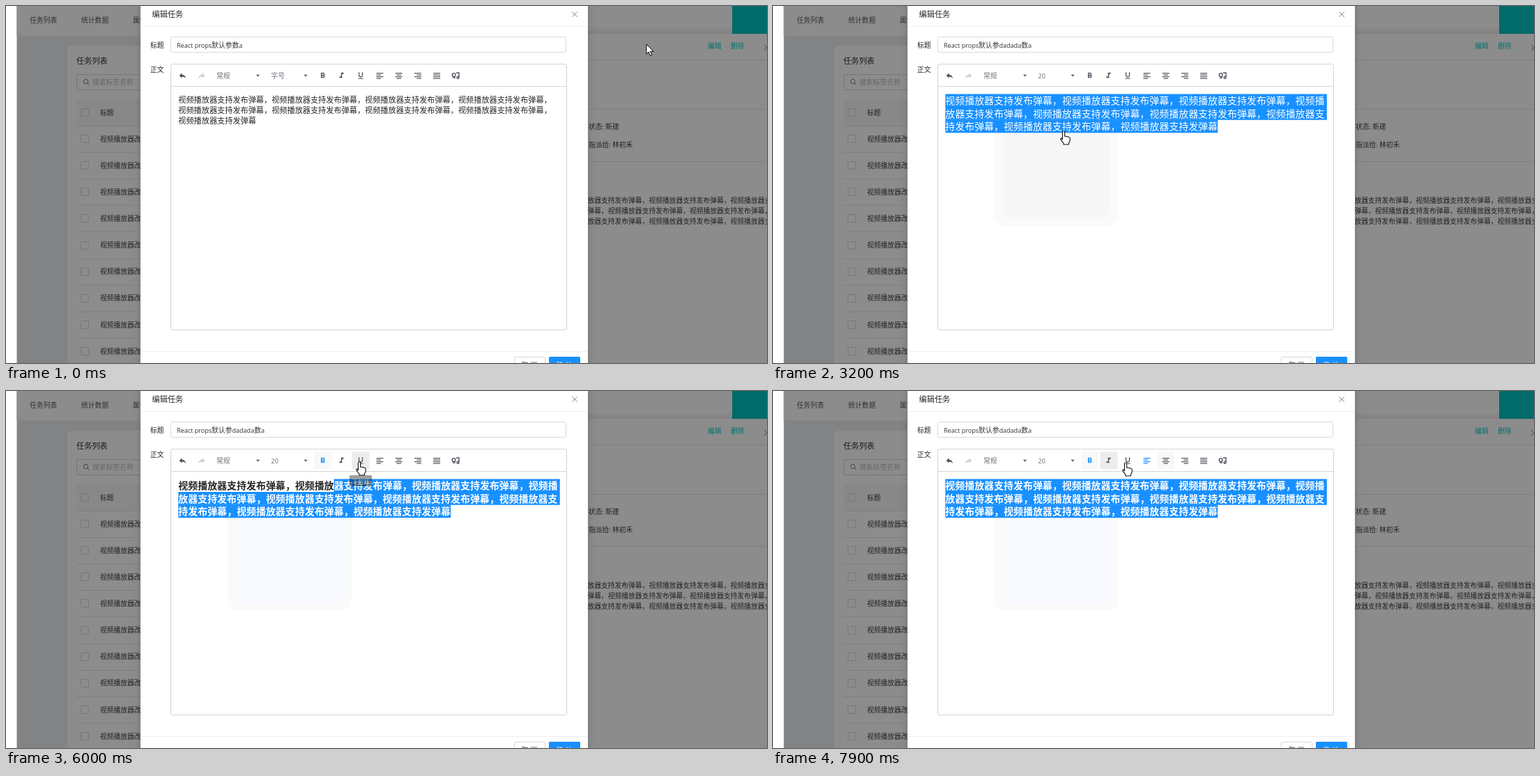
These frames come from a looping animation (1092x513 px, 8 s). An HTML page with a canvas:

```html
<!DOCTYPE html>
<html lang="zh-CN">
<head>
<meta charset="utf-8">
<title>编辑任务</title>
<style>
html, body { margin: 0; width: 100%; height: 100%; overflow: hidden; background: #fff; }
canvas { display: block; }
</style>
</head>
<body>
<canvas id="stage" width="1092" height="513"></canvas>
<script>
const ctx = document.getElementById('stage').getContext('2d');
const LOOP = 8000, STEP = 100;
const BLUE = '#1890ff', INK = '#50545e';
const CJK = '"Noto Sans CJK SC", "Noto Sans CJK", sans-serif';
const LATIN = '"Open Sans", "Noto Sans", sans-serif';

const phrase = '视频播放器支持发布弹幕，';
const body = phrase.repeat(8) + '视频播放器支持发弹幕';
const END = body.length;

// Pointer path: time, x, y
const path = [
  [0, 919, 55], [100, 919, 55], [400, 326, 57], [1100, 326, 57], [1200, 340, 95],
  [1400, 372, 183], [1500, 366, 163], [1600, 310, 150], [1700, 240, 135], [1800, 222, 121],
  [1900, 222, 121], [2300, 406, 108], [2600, 406, 110], [2700, 406, 115], [2900, 411, 166],
  [3000, 411, 166], [3200, 417, 180], [3600, 453, 101], [4100, 455, 101], [4800, 548, 180],
  [4900, 554, 188], [5000, 554, 188], [5200, 640, 176], [5300, 625, 172], [5400, 595, 165],
  [5500, 540, 150], [5600, 471, 137], [5700, 500, 116], [5900, 507, 102], [6200, 507, 102],
  [6400, 535, 102], [6500, 536, 102], [6600, 553, 100], [6700, 557, 99], [6800, 566, 108],
  [7000, 613, 197], [7100, 652, 180], [7200, 600, 176], [7300, 420, 150], [7400, 252, 136],
  [7500, 250, 139], [7600, 198, 139], [7700, 222, 121], [7800, 482, 102], [7900, 506, 103], [8000, 506, 103]
];
// Tooltips: start, end, centre, label
const tips = [
  [2300, 2800, 407, '字号'], [3700, 4200, 454.5, '加粗'], [5900, 6300, 509, '下划线'],
  [6350, 6750, 536.5, '居左'], [6680, 6900, 563.5, '居中']
];
const sizes = [12, 14, 16, 18, 20, 24, 28, 30, 32, 36, 40, 48, 56, 64, 72, 96, 120, 144];

const icons = {
  undo: 'M10 9V5l-7 7 7 7v-4.1c5 0 8.5 1.6 11 5.1-1-5-4-10-11-11z',
  redo: 'M14 9V5l7 7-7 7v-4.1c-5 0-8.5 1.6-11 5.1 1-5 4-10 11-11z',
  bold: 'M15.6 10.8c1-.7 1.65-1.8 1.65-2.8 0-2.3-1.75-4-4-4H7v14h7c2.1 0 3.7-1.7 3.7-3.8 0-1.5-.8-2.8-2.1-3.4zM10 6.5h3a1.5 1.5 0 0 1 0 3h-3zm3.5 9H10v-3h3.5a1.5 1.5 0 0 1 0 3z',
  italic: 'M10 4v3h2.2l-3.4 8H6v3h8v-3h-2.2l3.4-8H18V4z',
  under: 'M12 17c3.3 0 6-2.7 6-6V3h-2.5v8a3.5 3.5 0 0 1-7 0V3H6v8c0 3.3 2.7 6 6 6zm-7 2v2h14v-2z'
};
const pointers = {
  arrow: 'M0 0V14l3.2-3 2.2 5.2 2.4-1-2.2-5H10z',
  hand: 'M-1.6 11.5V1.3a1.6 1.6 0 0 1 3.2 0V7l6 1.2q2 .6 1.8 3l-.6 3.3-1.4 2.6V19H0v-1.6l-3.8-5q-1-1.8.6-2.4z',
  beam: 'M-3-8h2q1 0 1 1v14q0 1-1 1h-2M3-8h-2q-1 0-1 1v14q0 1 1 1h2'
};

const clamp = (v, a = 0, b = 1) => Math.min(b, Math.max(a, v));

function rect(x, y, w, h, fill, stroke, r = 0) {
  ctx.beginPath();
  ctx.roundRect(x, y, w, h, r);
  if (fill) { ctx.fillStyle = fill; ctx.fill(); }
  if (stroke) { ctx.lineWidth = 1; ctx.strokeStyle = stroke; ctx.stroke(); }
}

function shape(d, x, y, k, fill, stroke, width = 1) {
  const p = new Path2D(d);
  ctx.save();
  ctx.translate(x, y);
  ctx.scale(k, k);
  if (fill) { ctx.fillStyle = fill; ctx.fill(p); }
  if (stroke) { ctx.strokeStyle = stroke; ctx.lineWidth = width; ctx.stroke(p); }
  ctx.restore();
}

// Mixed Latin and Chinese text, vertically centred on cy; returns the right edge
function text(s, x, cy, size, color, weight = 400) {
  ctx.fillStyle = color;
  for (const run of s.match(/[ -~]+|[^ -~]+/g) || []) {
    ctx.font = /[ -~]/.test(run) ? `${weight} ${size * .93}px ${LATIN}` : `${weight} ${size}px ${CJK}`;
    ctx.fillText(run, x, cy + size * .37);
    x += ctx.measureText(run).width;
  }
  return x;
}

function centred(s, cx, cy, size, color, weight) {
  ctx.textAlign = 'center';
  text(s, cx, cy, size, color, weight);
  ctx.textAlign = 'left';
}

function cross(x, y, r, color) {
  shape(`M${-r} ${-r}L${r} ${r}M${r} ${-r}L${-r} ${r}`, x, y, 1, null, color);
}

function pointerAt(t) {
  const i = Math.max(1, path.findIndex(p => p[0] >= t));
  const [t0, x0, y0] = path[i - 1], [t1, x1, y1] = path[i];
  const k = clamp((t - t0) / (t1 - t0));
  return [x0 + (x1 - x0) * k, y0 + (y1 - y0) * k];
}

function drawPage() {
  const gray = '#8c8c8c', ink = '#303030', line = '#7f7f7f';
  rect(0, 0, 1092, 513, '#fff');
  rect(15.5, 0, 1077, 513, '#828385');
  rect(15.5, 0, 1077, 42.5, gray);
  ['任务列表', '统计数据', '属性管理'].forEach((s, i) => text(s, 34 + i * 74, 20.5, 9.8, ink));
  rect(88, 57, 300, 500, gray, null, 6);
  text('任务列表', 101, 79, 11.2, '#1c1c1c', 500);
  rect(101.5, 98.5, 200, 22, null, '#777', 1.5);
  shape('M3.2 0a3.2 3.2 0 1 1-6.4 0a3.2 3.2 0 1 1 6.4 0M2.3 2.3L5 5', 114.5, 108.5, 1, null, '#444');
  text('搜索标签名称', 124, 109.5, 9.8, '#666');
  rect(101, 134, 200, 38, '#888889');
  for (let i = 0; i < 10; i++) {
    const cy = 153 + i * 38.12;
    rect(107.5, Math.round(cy) - 5.5, 11, 11, null, '#787878', 1.5);
    text(i ? '视频播放器改造' : '标题', 135, cy, 9.77, '#222', i ? 400 : 500);
    rect(101, Math.round(cy + 19), 200, 1, line);
  }

  rect(1042, 0, 50, 40, '#006b6a');
  const shade = ctx.createLinearGradient(0, 30, 0, 40);
  shade.addColorStop(0, 'rgba(0,0,0,0)');
  shade.addColorStop(1, 'rgba(0,0,0,.08)');
  rect(835, 30, 207, 10, shade);
  rect(800, 40, 292, 473, gray);
  text('编辑', 1007, 57, 9.77, '#00736f', 500);
  text('删除', 1040, 57, 9.77, '#00736f', 500);
  cross(1092, 60, 4, '#444');
  for (const y of [77, 148, 223]) rect(835, y, 257, 1, line);
  text('状态: 新建', 836, 173.5, 9.77, '#222');
  text('指派给: 林初禾', 836, 199.5, 9.77, '#222');
  [3, 9, 3].forEach((from, i) => text(phrase.slice(from) + phrase.repeat(2), 834.5, 279 + i * 15, 9.77, '#222'));

  ctx.save();
  ctx.shadowColor = 'rgba(0,0,0,.2)';
  ctx.shadowBlur = 10;
  rect(193, -20, 642, 560, '#fff');
  ctx.restore();
  text('编辑任务', 209.5, 11.5, 11.2, '#262626', 500);
  cross(816, 12, 3.7, '#8a8a8a');
  rect(193, 29, 642, 1, '#efefef');
  rect(193, 496, 642, 1, '#efefef');
  text('标题', 207, 56, 9.8, '#262626');
  text('正文', 207, 91, 9.8, '#262626');
  rect(729.5, 504.5, 44, 30, null, '#d9d9d9', 1.5);
  rect(779, 504, 45, 30, BLUE, null, 1.5);
  text('取', 740, 516, 9.8, '#333');
  text('消', 752.5, 516, 9.8, '#333');
  text('确', 790, 516, 9.8, '#fff');
  text('认', 802.5, 516, 9.8, '#fff');
}

function drawInput(t) {
  const focus = clamp((t - 400) / 200) * clamp((1650 - t) / 250);
  const typed = 'dadada'.slice(0, clamp(Math.floor((t - 500) / 100), 0, 6));
  rect(236.5, 44.5, 567, 22, '#fff', '#d9d9d9', 2);
  if (focus) {
    ctx.globalAlpha = focus;
    ctx.lineWidth = 3;
    ctx.strokeStyle = 'rgba(24,144,255,.2)';
    ctx.strokeRect(235.5, 43.5, 569, 24);
    rect(236.5, 44.5, 567, 22, null, '#40a9ff', 2);
    ctx.globalAlpha = 1;
  }
  const x = text('React props默认参' + typed, 245, 56.5, 9.77, '#333');
  text('数a', x, 56.5, 9.77, '#333');
  if (t >= 500 && t < 1400) rect(x, 51, 1, 11, '#222');
}

function drawToolbar(t) {
  const [hx, hy] = pointerAt(t - STEP);
  const hovering = hy > 87 && hy < 113;
  const hot = x => hovering && Math.abs(hx - x) < 12.5;
  const bold = t >= 3800;
  if (hovering && hx > 373 && hx < 440) rect(373, 87.5, 67, 25, '#f0f0f0', null, 1.5);
  [454.5, 482, 509, 536.5, 563.5].forEach((x, i) => {
    const faint = i == 0 && bold || i == 4 && t >= 6800;
    if (hot(x) || faint) rect(x - 12.5, 87.5, 25, 25, hot(x) ? '#ececec' : '#f8f8f8', null, 1.5);
  });
  const icon = (name, x, color) => shape(icons[name], x - 6.3, 93.7, .525, color);
  icon('undo', 253.5, INK);
  icon('redo', 280.5, '#d0d0d0');
  text('常规', 302, 100, 9.8, '#6a6f7b');
  text(t < 3100 ? '字号' : '20', 380.5, 100, 9.8, '#6a6f7b');
  for (const x of [361.5, 430]) shape('M-2.6-1.2h5.2L0 1.6z', x, 100, 1, INK);
  icon('bold', 454.5, bold ? BLUE : INK);
  icon('italic', 481.5, INK);
  icon('under', 509, t >= 6100 && t < 7100 ? BLUE : INK);
  // Left, centre, right and justified bars
  for (let k = 0; k < 4; k++)
    for (let row = 0; row < 4; row++) {
      const w = row % 2 && k < 3 ? 6.5 : 10;
      rect(531.5 + k * 27.2 + [0, .5, 1, 0][k] * (10 - w), 96 + row * 2.5, w, 1.2, k == 0 && t >= 6500 ? BLUE : INK);
    }
  shape('M3 0a2.4 2.4 0 1 1-4.8 0a2.4 2.4 0 1 1 4.8 0M4-3h4v6.5M8 3.8a1.5 1.5 0 1 1-3 0a1.5 1.5 0 1 1 3 0M-1 4h4', 642, 99, 1, null, INK, 1.4);
}

function drawBody(t) {
  const big = t >= 3100;
  const size = big ? 13.96 : 11.17, cols = big ? 39 : 48;
  const pitch = big ? 18.5 : 15, top = 126.5, left = 247.3;
  const weight = t >= 3800 ? 700 : 400;

  // The selection trails the pointer by one step
  const dragged = (time, stop) => {
    const [x, y] = pointerAt(Math.min(time, stop) - STEP);
    const row = clamp(Math.floor((y - top) / pitch), 0, 2);
    return Math.min(END, row * cols + clamp(Math.round((x - left) / size), 0, cols));
  };
  let from = END;
  if (t >= 1600) from = dragged(t, 1900);
  if (t >= 5000) from = END;
  if (t >= 5300) from = dragged(t, 5700);
  if (t >= 7100) from = END;
  if (t >= 7200) from = dragged(t, 7500);

  // Faint trace left where the size menu was
  if (big) {
    rect(318, 182, 178, 133, '#fafafa', null, [0, 0, 14, 14]);
    rect(330, 182, 153, 122, t < 3800 ? '#f7f7f7' : '#f7fbff', null, [0, 0, 6, 6]);
  }
  for (let row = 0; row < 3; row++) {
    const a = row * cols, s = body.slice(a, a + cols);
    const y = top + row * pitch, cy = y + pitch / 2 + .4;
    text(s, left, cy, size, '#262626', weight);
    const skip = Math.max(0, from - a);
    if (skip < s.length) {
      const x = left + skip * size;
      const w = (s.length - skip) * size + (row < 2 ? 3 : 0);
      rect(x, y, w, pitch + .3, BLUE);
      text(s.slice(skip), x, cy, size, '#fff', weight);
    }
  }
  const blink = t == 1500 || t == 1600 || t >= 5100 && t < 5300;
  if (blink && from == END) rect(left + (END - 2 * cols) * size, top + 2 * pitch + 1, 1, pitch - 2, '#222');
}

function drawTips(t) {
  for (const [start, end, x, label] of tips) {
    if (t < start || t >= end) continue;
    const w = label.length * 8.4 + 7;
    ctx.globalAlpha = clamp((t - start) / 200);
    rect(x - w / 2, 121, w, 16, 'rgba(0,0,0,.75)', null, 1.5);
    centred(label, x, 129.5, 8.4, '#fff');
    ctx.globalAlpha = 1;
  }
}

function drawMenu(t) {
  if (t < 2500 || t >= 3100) return;
  const [px, py] = pointerAt(t);
  ctx.save();
  ctx.globalAlpha = clamp((t - 2360) / 330);
  ctx.shadowColor = 'rgba(0,0,0,.2)';
  ctx.shadowBlur = 14;
  rect(330, 123, 153.5, 174.5, '#21242a', null, 2);
  ctx.shadowColor = 'transparent';
  sizes.forEach((n, i) => {
    const cx = 358 + i % 3 * 49, cy = 141 + Math.floor(i / 3) * 27.9;
    const over = Math.abs(px - cx) < 21 && Math.abs(py - cy) < 11;
    rect(cx - 21.5, cy - 11, 42.5, 21.5, `rgba(255,255,255,${over ? .3 : .12})`, null, 1.5);
    centred(String(n), cx, cy, 9, '#fff', 600);
  });
  ctx.restore();
}

function drawPointer(t) {
  const [x, y] = pointerAt(t);
  const onBar = y > 83 && y < 117 && x > 236;
  const onMenu = t >= 2400 && t <= 3200;
  if (x > 835) shape(pointers.arrow, x, y, 1, '#fff', '#000');
  else if (onBar || onMenu) shape(pointers.hand, x, y, 1, '#fff', '#111', 1.1);
  else {
    shape(pointers.beam, x, y, 1, null, 'rgba(255,255,255,.8)', 3);
    shape(pointers.beam, x, y, 1, null, '#000', 1.5);
  }
}

function draw(t) {
  drawPage();
  drawInput(t);
  rect(236.5, 83.5, 568, 382, '#fff', '#d4d4d4', 2.5);
  rect(237, 115, 567, 1, '#d6d6d6');
  drawToolbar(t);
  drawBody(t);
  drawTips(t);
  drawMenu(t);
  drawPointer(t);
}

let origin;
function tick(now) {
  origin ??= now;
  draw(Math.floor((now - origin) % LOOP / STEP) * STEP);
  requestAnimationFrame(tick);
}
requestAnimationFrame(tick);
</script>
</body>
</html>
```
